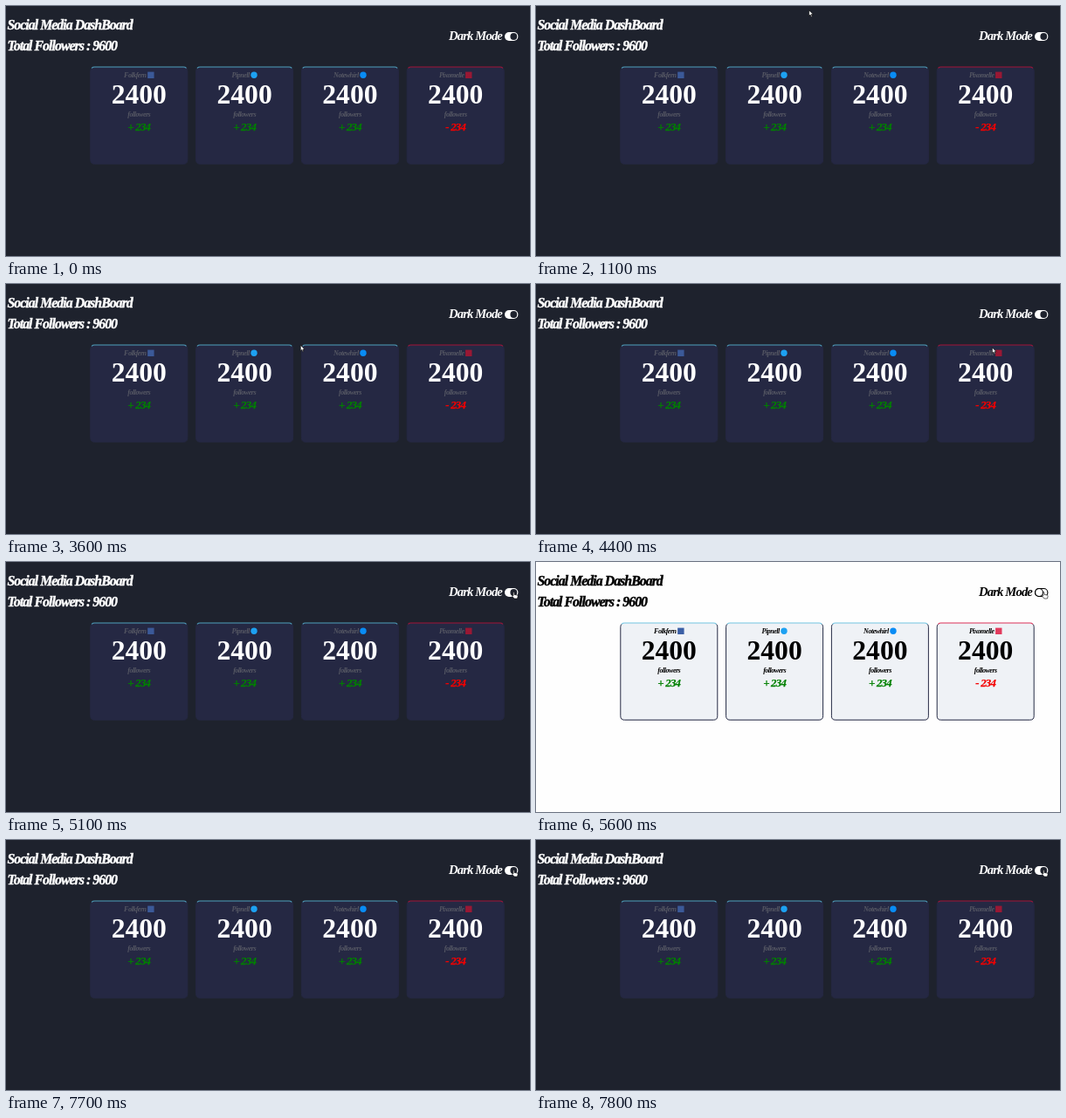
Write an HTML page that moves like this. It is 600x287 px and loops after 8000 ms.

```html
<!DOCTYPE html>
<html lang="en">
<head>
<meta charset="utf-8">
<title>Dashboard</title>
<style>
  html, body { margin: 0; width: 100%; height: 100%; overflow: hidden; }
  svg {
    --page: #1e222d; --card: #252843; --edge: #252843; --ink: #fff; --muted: #565864;
    --blue: #4f9fbd; --red: #a31539; --square: #3b5998; --photo: #991834;
    display: block; width: 100%; height: 100%; background: var(--page);
  }
  svg.light {
    --page: #fefefe; --card: #eff2f6; --edge: #252a45; --ink: #000; --muted: #000;
    --blue: #72c5e2; --red: #dc3158; --square: #3b5fa5; --photo: #e23b5d;
  }
  text { font: italic bold 15.8px "Liberation Serif", serif; letter-spacing: -.06em; fill: var(--ink); }
  .title { stroke: var(--ink); stroke-width: .45; }
  .mode { font-size: 14.7px; }
  .small { font-size: 8px; fill: var(--muted); }
  .count { font-size: 31.6px; font-style: normal; letter-spacing: 0; }
  .delta { font-size: 12.8px; stroke-width: .25; }
  .up { fill: #008000; stroke: #008000; }
  .down { fill: #f40000; stroke: #f40000; }
  .mid { text-anchor: middle; }
  .light .on, svg:not(.light) .off { display: none; }
  .cursor { fill: #fff; stroke: #000; stroke-width: .6; stroke-linejoin: round; }
</style>
</head>
<body>
<svg id="stage" viewBox="0 0 600 287">
  <text class="title" x="1.5" y="27.3">Social Media DashBoard</text>
  <text class="title" x="1.5" y="50.8">Total Followers : 9600</text>
  <text class="mode" x="507" y="39.3">Dark Mode</text>
  <g class="on">
    <rect x="571" y="30" width="15.4" height="10" rx="5" fill="#fff"/>
    <circle cx="581.3" cy="35" r="3.9" fill="var(--page)"/>
  </g>
  <g class="off" fill="none" stroke="#000" stroke-width="1.1">
    <rect x="571.5" y="30.5" width="14.4" height="9" rx="4.5"/>
    <circle cx="576" cy="35" r="4.5"/>
  </g>
  <g id="cards"></g>
  <path id="arrow" class="cursor" d="M.3 .3V6.7L1.8 5.4 2.8 7.8 3.9 7.3 2.9 5H5Z"/>
  <path id="hand" class="cursor" d="M1.8 4.8V1Q1.8 .3 2.4 .3T3.1 1V3.1L6.3 3.7Q7.3 4 7.1 5.2L6.5 7.7H3L.5 5Q.3 4.2 1 4.2Z"/>
</svg>
<script>
const stage = document.getElementById("stage");
const arrow = document.getElementById("arrow");
const hand = document.getElementById("hand");

const LOOP = 8000, STEP = 100;
const CURSOR_IN = 100, HAND_FROM = 4900, LIGHT_FROM = 5600, LIGHT_TO = 7700;
const CARD_GAP = 120.8, CARD_MID = 55.5;

const cards = [
  { name: "Folkfern", color: "var(--square)", square: true },
  { name: "Pipnell", color: "#1da1f2" },
  { name: "Notewhirl", color: "#098cf5" },
  { name: "Pixomelle", color: "var(--photo)", square: true, down: true },
];

function cardMarkup({ name, color, square, down }, i) {
  return `<g transform="translate(${96.8 + i * CARD_GAP} 70)">
    <rect width="111" height="111.3" rx="4.5" fill="var(--card)"/>
    <g fill="none">
      <path d="M1.3 1.3Q0 2.6 0 4.5V106.8Q0 111.3 4.5 111.3H106.5Q111 111.3 111 106.8V4.5Q111 2.6 109.7 1.3" stroke="var(--edge)"/>
      <path d="M1.3 1.3Q2.6 0 4.5 0H106.5Q108.4 0 109.7 1.3" stroke="var(--${down ? "red" : "blue"})" stroke-width="1.2"/>
    </g>
    <text class="small mid name" x="${CARD_MID - 4.5}" y="12.4">${name}</text>
    <rect class="icon" y="5.6" width="7.4" height="7.4" rx="${square ? 0 : 3.7}" fill="${color}"/>
    <text class="count mid" x="${CARD_MID}" y="42.3">2400</text>
    <text class="small mid" x="${CARD_MID}" y="57.4">followers</text>
    <text class="delta mid ${down ? "down" : "up"}" x="${CARD_MID}" y="73">${down ? "-" : "+"} 234</text>
  </g>`;
}

const cardLayer = document.getElementById("cards");
cardLayer.innerHTML = cards.map(cardMarkup).join("");

// Name and icon are centred together
for (const card of cardLayer.children) {
  const nameWidth = card.querySelector(".name").getComputedTextLength();
  card.querySelector(".icon").setAttribute("x", CARD_MID + nameWidth / 2 - 2.9);
}

// Where the pointer turns or rests: time, x, y
const turns = [
  [300, 457, 70], [900, 237, 6], [1400, 451, 2], [1900, 183, 79], [2200, 308.5, 26],
  [2800, 195, 85], [3600, 337, 70], [4000, 483, 79.5], [4200, 483, 79.5],
  [4700, 594, 60], [5100, 579, 34.3],
];

const mix = (a, b, k) => a + (b - a) * k;
const ease = k => k * k * (3 - 2 * k);

function pointerAt(t) {
  const next = turns.findIndex(([time]) => time > t);
  if (next < 1) return turns.at(next).slice(1);
  const [t0, x0, y0] = turns[next - 1], [t1, x1, y1] = turns[next];
  const k = ease((t - t0) / (t1 - t0));
  return [mix(x0, x1, k), mix(y0, y1, k)];
}

function draw() {
  const t = Math.floor(performance.now() % LOOP / STEP) * STEP;
  const place = `translate(${pointerAt(t)})`;
  stage.classList.toggle("light", t >= LIGHT_FROM && t < LIGHT_TO);
  arrow.setAttribute("transform", place);
  hand.setAttribute("transform", place);
  arrow.style.display = t >= CURSOR_IN && t < HAND_FROM ? "" : "none";
  hand.style.display = t >= HAND_FROM ? "" : "none";
  requestAnimationFrame(draw);
}
draw();
</script>
</body>
</html>
```
